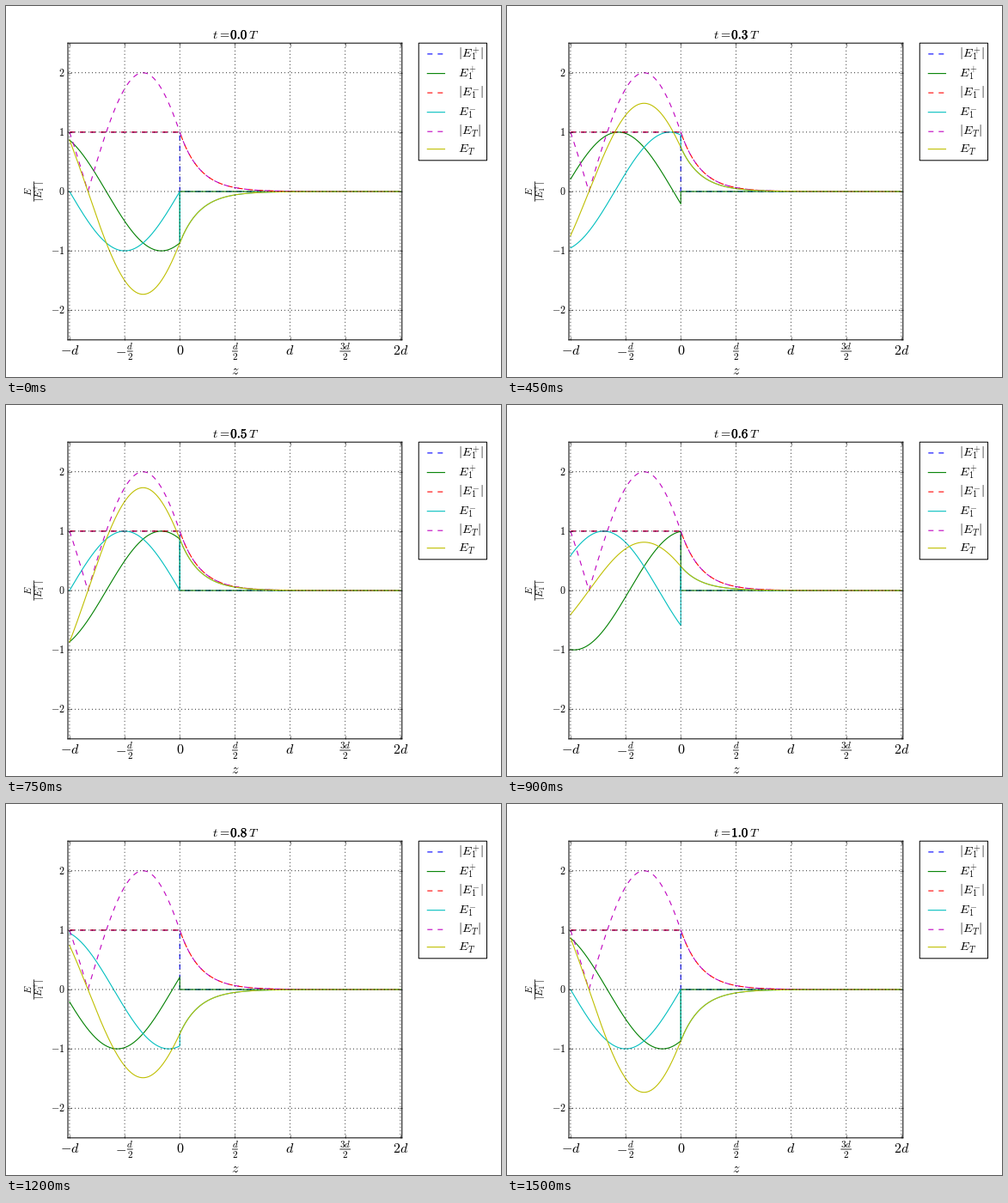
Animation of 576 by 432 pixels, one loop 1.65 s. Source, as a matplotlib script:

```python
import numpy as np
import matplotlib.pyplot as plt
from matplotlib.animation import FuncAnimation
from matplotlib.lines import Line2D
from matplotlib.patches import Rectangle
from matplotlib.patheffects import withStroke

WIDTH, HEIGHT, DPI = 576, 432, 72
FRAMES, INTERVAL = 11, 150
K = np.pi                 # wave number, with lengths in units of d
KAPPA = np.sqrt(3) * K    # decay rate behind the interface

plt.style.use("classic")
plt.rcParams.update({"savefig.dpi": "figure", "mathtext.fontset": "cm",
                     "grid.linewidth": 0.8, "lines.linewidth": 1.1})

fig = plt.figure(figsize=(WIDTH / DPI, HEIGHT / DPI), dpi=DPI, facecolor="white")
ax = fig.add_axes([0.125, 0.1, 0.675, 0.8])
ax.set_xlim(-1.015, 2.015)
ax.set_ylim(-2.5, 2.5)
ax.set_xticks(np.arange(-1, 2.1, 0.5))
ax.set_yticks(range(-2, 3))
ax.tick_params(labelbottom=False, labelleft=False)
ax.grid(True)
for artist in [*ax.spines.values(), *ax.get_xgridlines(), *ax.get_ygridlines()]:
    artist.set_snap(False)


def to_fig(x, y):
    """Pixels from the top left corner to figure fractions."""
    return x / WIDTH, 1 - y / HEIGHT


def shift(x, y, along, up, rotation):
    """Move along and above a baseline that is level or turned by 90 degrees."""
    return (x - up, y - along) if rotation else (x + along, y - up)


def label(x, y, tex, size, ha="center", rotation=0):
    return fig.text(*to_fig(x, y), f"${tex}$", size=size, ha=ha, va="baseline",
                    rotation=rotation, rotation_mode="anchor")


def rule(start, end, **style):
    points = [to_fig(*start), to_fig(*end)]
    fig.add_artist(Line2D(*zip(*points), snap=False, **style))


def field_symbol(x, y, size, sub, sup="", bars=False, rotation=0):
    """E with stacked scripts and optional bars, spaced in ems from the left."""
    left = 0.278 if bars else 0
    script_end = left + (1.46 if sup else 1.24)
    parts = [(left, 0, "E", 1), (left + 0.738, -0.22, sub, 0.7)]
    if sup:
        parts.append((left + 0.80, 0.39, sup, 0.7))
    if bars:
        parts += [(0, 0, "|", 1), (script_end, 0, "|", 1)]
    for along, up, tex, scale in parts:
        px, py = shift(x, y, along * size, up * size, rotation)
        label(px, py, tex, scale * size, "left", rotation)


def fraction_rule(x, y, size, width, rotation=0):
    ends = [shift(x, y, side * width / 2, 0.25 * size, rotation) for side in (-1, 1)]
    rule(*ends, color="black", lw=0.8)


def fraction(x, y, num, size):
    label(x, y - 0.394 * size, num, 0.7 * size)
    label(x, y + 0.345 * size, "2", 0.7 * size)
    fraction_rule(x, y, size, 0.37 * size * len(num))


def x_tick(i):
    return 73.9 + 64.16 * i


for i, tex in {0: "-d", 2: "0", 4: "d", 6: "2d"}.items():
    label(x_tick(i), 406, tex, 16)
label(x_tick(1) - 4.8, 406, "-", 16)
fraction(x_tick(1) + 6.2, 406, "d", 16)
fraction(x_tick(3), 406, "d", 16)
fraction(x_tick(5), 406, "3d", 16)
for value in range(-2, 3):
    label(68.3, 216 - 69.12 * value + 4, str(value), 12, ha="right")
label(266.4, 429, "z", 16)

label(30.2, 216, "E", 11.2, rotation=90)
fraction_rule(36.5, 216, 16, 22.5, rotation=90)
field_symbol(42, 227.3, 11.2, "1", "+", bars=True, rotation=90)

label(240.4, 38.2, r"t\hspace{0.08}=", 14.4, "left")
clock = label(271.4, 38.2, "0", 15)
clock.set_path_effects([withStroke(linewidth=0.35, foreground="black")])
label(282, 38.2, "T", 14.4, "left")

# Two samples at the interface make the jump there vertical.
z = np.concatenate([np.linspace(-1, 0, 400), np.linspace(0, 2, 800)])
inside = np.arange(z.size) < 400
decay = np.exp(-KAPPA * z.clip(0))
standing = np.where(inside, 2 * np.cos(K * z + np.pi / 3), decay)


def fields(t):
    phase = 2 * np.pi * t
    transmitted = np.cos(phase - 5 * np.pi / 6)
    forward = np.where(inside, np.cos(phase - K * z - 7 * np.pi / 6), 0)
    backward = np.where(inside, np.sin(phase + K * z), transmitted * decay)
    return forward, backward, standing * transmitted


# subscript, superscript, colour, envelope (None for a moving wave), legend baseline
curves = [
    ("1", "+", "b", np.where(inside, 1.0, 0.0), 59),
    ("1", "+", "g", None, 81.7),
    ("1", "-", "r", decay, 104.2),
    ("1", "-", "c", None, 126.8),
    ("T", "", "m", np.abs(standing), 149.3),
    ("T", "", "y", None, 169.7),
]

fig.add_artist(Rectangle(to_fig(480.24, 179.8), 79.3 / WIDTH, 136.6 / HEIGHT,
                         fc="white", ec="black", lw=1, snap=False))
waves = []
for sub, sup, color, envelope, base in curves:
    moving = envelope is None
    style = dict(color=color, ls="-" if moving else "--")
    line, = ax.plot(z, 0 * z if moving else envelope, snap=False, **style)
    if moving:
        waves.append(line)
    rule((490.3, base - 3.1), (510.5, base - 3.1), **style)
    field_symbol(526.3, base, 14.4, sub, sup, bars=not moving)


def update(frame):
    t = frame / (FRAMES - 1)
    for line, field in zip(waves, fields(t)):
        line.set_ydata(field)
    clock.set_text(rf"$\mathbf{{{t:.1f}}}$")
    return [*waves, clock]


anim = FuncAnimation(fig, update, frames=FRAMES, interval=INTERVAL, repeat=True)
plt.show()
```
